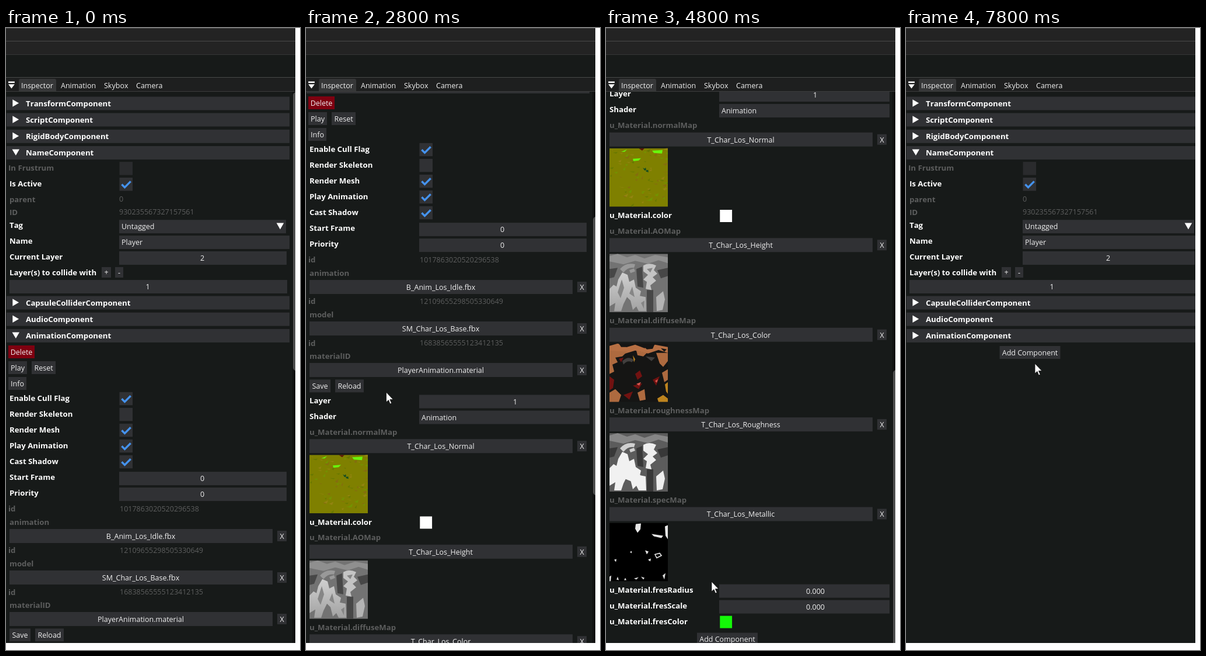
An HTML page for the animation above (8 s loop, 504 px wide and 1064 px high).

```html
<!DOCTYPE html>
<html lang="en">
<head>
<meta charset="utf-8">
<title>Inspector panel</title>
<style>
html, body { margin: 0; width: 100%; height: 100%; overflow: hidden; background: #fff; }
svg { display: block; }
text { font: 12.5px "Open Sans", sans-serif; font-kerning: none; font-variant-ligatures: none; fill: #f0f0f0; }
.b { font-size: 13.2px; font-weight: 700; fill: #fff; }
.dim { fill: #5d5e5e; }
.mid { text-anchor: middle; }
</style>
</head>
<body>
<svg id="stage" width="504" height="1064" viewBox="0 0 504 1064">
  <defs>
    <clipPath id="screen"><rect width="496" height="1052"/></clipPath>
    <clipPath id="body"><rect y="109" width="496" height="943"/></clipPath>
    <clipPath id="tile"><rect width="100" height="100"/></clipPath>
    <linearGradient id="fade" x2="0" y2="1">
      <stop stop-color="#d0d0d0"/><stop offset="1" stop-color="#a2a2a2"/>
    </linearGradient>
  </defs>
  <g clip-path="url(#screen)">
    <g id="chrome"></g>
    <g clip-path="url(#body)">
      <g id="list"></g>
      <g id="bar">
        <rect x="491" y="109" width="14" height="960" fill="#101111"/>
        <rect id="grab" x="492" width="12" height="476" rx="5" fill="#4e4f4f"/>
      </g>
    </g>
    <path id="cursor" d="M0 0V17L4 13.5 6.6 20 9.2 18.8 6.4 12.6H12Z" fill="#fff" stroke="#111" stroke-width=".8"/>
  </g>
</svg>
<script>
const NS = 'http://www.w3.org/2000/svg';
const $ = id => document.getElementById(id);
const FIELD = '#303134', HOVER = '#4a4c4b', STEP = 85.2, MAX = 950.5;

function add(parent, tag, attrs, content) {
  const node = document.createElementNS(NS, tag);
  for (const k in attrs) node.setAttribute(k, attrs[k]);
  if (content !== undefined) node.textContent = content;
  parent.appendChild(node);
  return node;
}
const box = (g, x, y, w, h, fill = FIELD) => add(g, 'rect', { x, y, width: w, height: h, fill });
const shape = (g, d, fill) => add(g, 'path', { d, fill });
const label = (g, x, y, s, cls = '') => add(g, 'text', { x, y: y + 4.6, class: cls }, s);

function rng(seed) {
  return () => (seed = (seed * 16807) % 2147483647) / 2147483647;
}

// Texture thumbnails, 100 x 100
const ART = {
  strip: 'M0 4L14 0 30 6 44 2 60 8 78 2 100 6V16L84 11 66 17 44 12 24 18 0 13Z',
  mass: 'M0 60L7 53 12 56 15 44 22 32 31 36 34 48 42 44 45 58 54 64 52 72 62 74 63 98H50L46 90 40 96 36 80 30 74 24 86 20 98H8L10 84 0 90Z',
  curl: 'M58 20Q68 14 80 20L76 28 82 34 74 40 80 46 70 54 72 62 62 60 64 48 58 44 66 36 58 30Z',
  foot: 'M80 74L92 64 95 78 91 96 81 98Z',
  arch: 'M18 26Q28 14 44 18L42 24Q32 22 24 32ZM34 28L42 25 44 30 36 33Z',
  shade: 'M46 26L56 22 58 58 48 56ZM64 62H75V100H64ZM82 28L100 24V38L88 42ZM0 26L14 24 8 40 0 42Z'
};
function specks(g, seed, n, colors, size) {
  const r = rng(seed);
  for (let i = 0; i < n; i++) {
    const x = r() * 100, y = r() * 100, a = size * (.4 + r()), b = size * (r() - .3);
    shape(g, `M${x} ${y}l${a} ${-b}l${-a * .3} ${b + 2}Z`, colors[i % colors.length]);
  }
}
function layers(g, base, colors) {
  box(g, 0, 0, 100, 100, base);
  for (const k in colors) shape(g, ART[k], colors[k]);
}
const TILES = {
  normal(g) {
    box(g, 0, 0, 100, 100, '#7f8000');
    specks(g, 71, 80, ['#697800', '#938411', '#729400', '#856c10'], 7);
    shape(g, 'M73 4L91 3 90 9 76 8ZM40 18L54 17 50 21 41 22ZM20 6L30 2 26 6Z', '#69f50c');
    shape(g, 'M50 0H60L56 4Z', '#5d1608');
    shape(g, 'M57 33l3 2 2-2 1 4-3 1zM62 38l4-1 1 4-4-1z', '#164d22');
  },
  height(g) {
    layers(g, '#737373', { strip: '#8f8f8f', shade: '#474747', mass: 'url(#fade)', curl: '#c4c4c4', foot: '#b4b4b4', arch: '#999' });
    shape(g, 'M14 66L21 44 25 58 19 76ZM34 68L39 56 43 74ZM54 84L60 80 59 94ZM64 26L74 24 70 32Z', '#868686');
  },
  color(g) {
    layers(g, '#151514', { strip: '#b66f43' });
    shape(g, 'M0 12L30 14 22 22 10 24 14 32 5 36 8 48 0 52ZM46 12L64 16 58 22 48 20ZM80 16H100V30L92 40 86 34ZM90 50L100 44V62L94 66ZM0 84L10 78 20 88 16 100H0ZM48 84L60 78 62 96 52 98Z', '#ae6a3f');
    shape(g, 'M0 56L8 62 6 76 0 80ZM44 52L52 46 56 56 48 62ZM40 72L56 68 50 78ZM24 88L40 82 34 96ZM74 62L86 56 80 72ZM16 26L24 24 20 32Z', '#711211');
    shape(g, 'M46 69L54 66 51 72ZM78 64L83 61 81 67Z', '#d8574f');
    shape(g, 'M95 70L100 66V86L97 82ZM82 94L92 88 100 94V100H84ZM40 20L44 27 42 32Z', '#bd841f');
    shape(g, 'M22 30Q32 20 42 28L38 32Q31 28 24 36ZM62 22L78 24 72 30Z', '#413f3e');
    shape(g, 'M16 0H34L30 6H20ZM58 4L78 0 74 9 64 10ZM88 8L98 10 94 14Z', '#151514');
  },
  rough(g) {
    layers(g, '#5c5c5c', { strip: '#868686', shade: '#383838', mass: '#f1f1f1', curl: '#eee', foot: '#eee', arch: '#d0d0d0' });
    shape(g, 'M14 62L22 40 34 50 46 60 54 74 44 88 36 82 26 78Z', '#f1f1f1');
  },
  metal(g) {
    box(g, 0, 0, 100, 100, '#000');
    shape(g, 'M45 2L54 1 53 11 48 17 44 10ZM72 19L92 22 89 26 76 23ZM95 6L100 4V28L96 22ZM61 47L67 49 64 54ZM66 63L71 61 70 66ZM8 63L12 62 11 67ZM35 50L38 48 38 52Z', '#e8e8e8');
    add(g, 'path', { d: 'M78 54L86 52 89 56 81 60Z', fill: 'none', stroke: '#e8e8e8', 'stroke-width': 1.6 });
    shape(g, 'M0 92L3 90 2 100H0ZM12 97L14 92 16 98ZM25 98L27 94 29 98ZM42 95L50 93 46 97ZM54 92L60 94 58 97ZM91 90L96 86 94 97Z', '#ddd');
  }
};

// One complete list of rows; wide = no scroll bar, last section folded
function build(wide) {
  const g = add($('list'), 'g', {}), heads = [];
  const col = wide ? 200 : 194, grow = wide ? 14 : 0;

  const head = (y, name, open) => {
    const rect = box(g, 1, y - 11.5, 485 + grow, 23);
    heads.push({ y, rect });
    shape(g, open ? `M10.5 ${y - 6}h12.5l-6.2 10.6Z` : `M11.3 ${y - 6.7}v12.4l10.8-6.2Z`, '#fff');
    label(g, 34, y + .3, name, 'b');
  };
  const name = (y, s, dim, x = 6) => label(g, x, y, s, dim ? 'b dim' : 'b');
  const check = (y, s, on, dim) => {
    name(y, s, dim, dim ? 4 : 6);
    box(g, col + .5, y - 10.5, 22.5, 22.5, dim ? '#2a2b2d' : FIELD);
    if (on) add(g, 'path', { d: `M${col + 4.4} ${y + 1}l5.1 5.1 10.2-10.2`, fill: 'none', stroke: '#4593ee', 'stroke-width': 3.4 });
  };
  const info = (y, s, value, x) => {
    name(y, s, true, s === 'id' ? 4 : 6);
    label(g, x, y - .5, value, 'dim');
  };
  const field = (y, s, value, right, mid) => {
    name(y, s);
    box(g, col, y - 9.5, right + grow - col, 23);
    label(g, mid || col + 4, y + 2, value, mid ? 'mid' : '');
  };
  const button = (x, y, w, s, fill) => {
    box(g, x, y - 11, w, 22, fill);
    label(g, x + w / 2, y, s, 'mid');
  };
  const asset = (y, s, file) => {
    name(y, s, true);
    box(g, 6, y + 12, 451, 24);
    label(g, 231, y + 24.3, file, 'mid');
    box(g, 465, y + 15, 16, 18);
    label(g, 473, y + 24.3, 'X', 'mid');
  };
  const tile = (y, draw) => draw(add(g, 'g', { transform: `translate(6 ${y})`, 'clip-path': 'url(#tile)' }));
  const swatch = (y, s, fill) => {
    name(y, s);
    box(g, col + 1.3, y - 9.5, 20.8, 21, fill);
  };

  head(129, 'TransformComponent');
  head(157, 'ScriptComponent');
  head(185.3, 'RigidBodyComponent');
  head(213.5, 'NameComponent', true);
  check(239.5, 'In Frustrum', false, true);
  check(266.5, 'Is Active', true);
  info(293, 'parent', '0', col);
  info(315, 'ID', '930235567327157561', col);
  field(337.7, 'Tag', 'Untagged', 480);
  shape(g, `M${463.7 + grow} 333.6h12.6l-6.3 10.8Z`, '#fff');
  field(364.6, 'Name', 'Player', 486);
  field(391.5, 'Current Layer', '2', 481, wide ? 346.5 : 336.5);
  name(418.5, 'Layer(s) to collide with');
  box(g, 164, 409, 16, 18);
  label(g, 172, 417.5, '+', 'mid');
  box(g, 187, 409, 14, 18);
  label(g, 194, 418, '-', 'mid');
  box(g, 6, 431, 476 + grow, 23);
  label(g, wide ? 250 : 243, 442.5, '1', 'mid');
  head(470, 'CapsuleColliderComponent');
  head(498.2, 'AudioComponent');
  head(526.4, 'AnimationComponent', !wide);
  if (wide) {
    button(160.5, 555, 104, 'Add Component');
    return { g, heads };
  }

  button(4, 554, 45, 'Delete', '#7e0010');
  button(4, 581, 32, 'Play');
  button(44, 581, 41, 'Reset');
  button(4, 608, 31, 'Info');
  ['Enable Cull Flag', 'Render Skeleton', 'Render Mesh', 'Play Animation', 'Cast Shadow']
    .forEach((s, i) => check(633.3 + 27 * i, s, i !== 1));
  field(768.6, 'Start Frame', '0', 481, 336.5);
  field(795.6, 'Priority', '0', 481, 336.5);
  info(822.5, 'id', '1017863020520296538', 195);
  asset(845, 'animation', 'B_Anim_Los_Idle.fbx');
  info(893.8, 'id', '12109655298505330649', 195);
  asset(916, 'model', 'SM_Char_Los_Base.fbx');
  info(965, 'id', '16838565555123412135', 195);
  asset(987, 'materialID', 'PlayerAnimation.material');
  button(6, 1038.3, 36, 'Save');
  button(50, 1038.3, 49, 'Reload');
  field(1063, 'Layer', '1', 486, 358.5);
  field(1090, 'Shader', 'Animation', 486);
  [
    [1117.2, 'normalMap', 'Normal', TILES.normal],
    [1297.8, 'AOMap', 'Height', TILES.height],
    [1451.2, 'diffuseMap', 'Color', TILES.color],
    [1604.6, 'roughnessMap', 'Roughness', TILES.rough],
    [1758, 'specMap', 'Metallic', TILES.metal]
  ].forEach(([y, key, file, draw]) => {
    asset(y, 'u_Material.' + key, 'T_Char_Los_' + file);
    tile(y + 39, draw);
  });
  swatch(1271, 'u_Material.color', '#fff');
  field(1911.6, 'u_Material.fresRadius', '0.000', 486, 359);
  field(1938.6, 'u_Material.fresScale', '0.000', 486, 359);
  swatch(1965.6, 'u_Material.fresColor', '#14f808');
  button(156, 1996, 104, 'Add Component');
  return { g, heads };
}

function buildChrome() {
  const g = $('chrome');
  box(g, 0, 0, 496, 1052, '#171a19');
  box(g, 0, 0, 496, 46, '#232323');
  box(g, 0, 85, 496, 23, '#1e1f1f');
  [[0, '#4a4a4a'], [22, '#4a4a4a'], [45, '#363737'], [84, '#484949'], [108, '#3c3d3d']]
    .forEach(([y, fill]) => box(g, 0, y, 496, 1, fill));
  shape(g, 'M22 108V90Q22 87 25 87H83Q86 87 86 90V108Z', '#363738');
  box(g, 4, 91.4, 10.8, 2.6, '#fff');
  shape(g, 'M4 96.3h10.8l-5.4 7.2Z', '#fff');
  [[26, 'Inspector'], [94, 'Animation'], [168, 'Skybox'], [223, 'Camera']]
    .forEach(([x, s]) => label(g, x, 98, s));
}

// Wheel notches and pointer path
const DOWN = [1500, 1700, 2000, 2500, 2800, 3000, 3300, 3600, 3800, 3900, 4100, 4300];
const UP = [5700, 5800, 5900, 6100, 6200, 6300, 6400, 6500, 6500, 6600, 6700, 6800];
const PATH = [
  [1100, -14, 500], [1500, 180, 442], [2400, 180, 442], [3200, 95, 804], [3700, 95, 804],
  [4400, 181, 947], [4900, 181, 947], [5400, 149, 274], [6900, 149, 274],
  [7300, 152, 522], [7500, 152, 522], [7800, 221, 574]
];
const FOLD = 7400, LOOP = 8000;

const passed = (list, t) => list.filter(v => v <= t).length;
function scrollAt(t) {
  const top = Math.min(MAX, passed(DOWN, t) * STEP);
  return Math.max(0, top - passed(UP, t) * STEP);
}
function pointerAt(t) {
  const i = PATH.findIndex(p => p[0] > t);
  if (i === 0) return [-40, 500];
  if (i < 0) return PATH[PATH.length - 1].slice(1);
  const [t0, x0, y0] = PATH[i - 1], [t1, x1, y1] = PATH[i];
  const u = (t - t0) / (t1 - t0), k = u * u * (3 - 2 * u);
  return [x0 + (x1 - x0) * k, y0 + (y1 - y0) * k];
}

buildChrome();
const full = build(false), folded = build(true);

function render(ms) {
  const t = Math.min(7800, Math.floor((ms % LOOP) / 100) * 100);
  const closed = t >= FOLD, view = closed ? folded : full;
  const scroll = scrollAt(t), [x, y] = pointerAt(t);
  full.g.style.display = closed ? 'none' : '';
  folded.g.style.display = closed ? '' : 'none';
  $('bar').style.display = closed ? 'none' : '';
  view.g.setAttribute('transform', `translate(0 ${-scroll})`);
  $('grab').setAttribute('y', 110 + scroll / 2);
  $('cursor').setAttribute('transform', `translate(${x} ${y})`);
  for (const h of view.heads) {
    const over = x > 0 && y > 109 && Math.abs(y + scroll - h.y) < 12;
    h.rect.setAttribute('fill', over ? HOVER : FIELD);
  }
}

const start = performance.now();
function tick(now) {
  render(Math.max(0, now - start));
  requestAnimationFrame(tick);
}
render(0);
requestAnimationFrame(tick);
</script>
</body>
</html>
```
